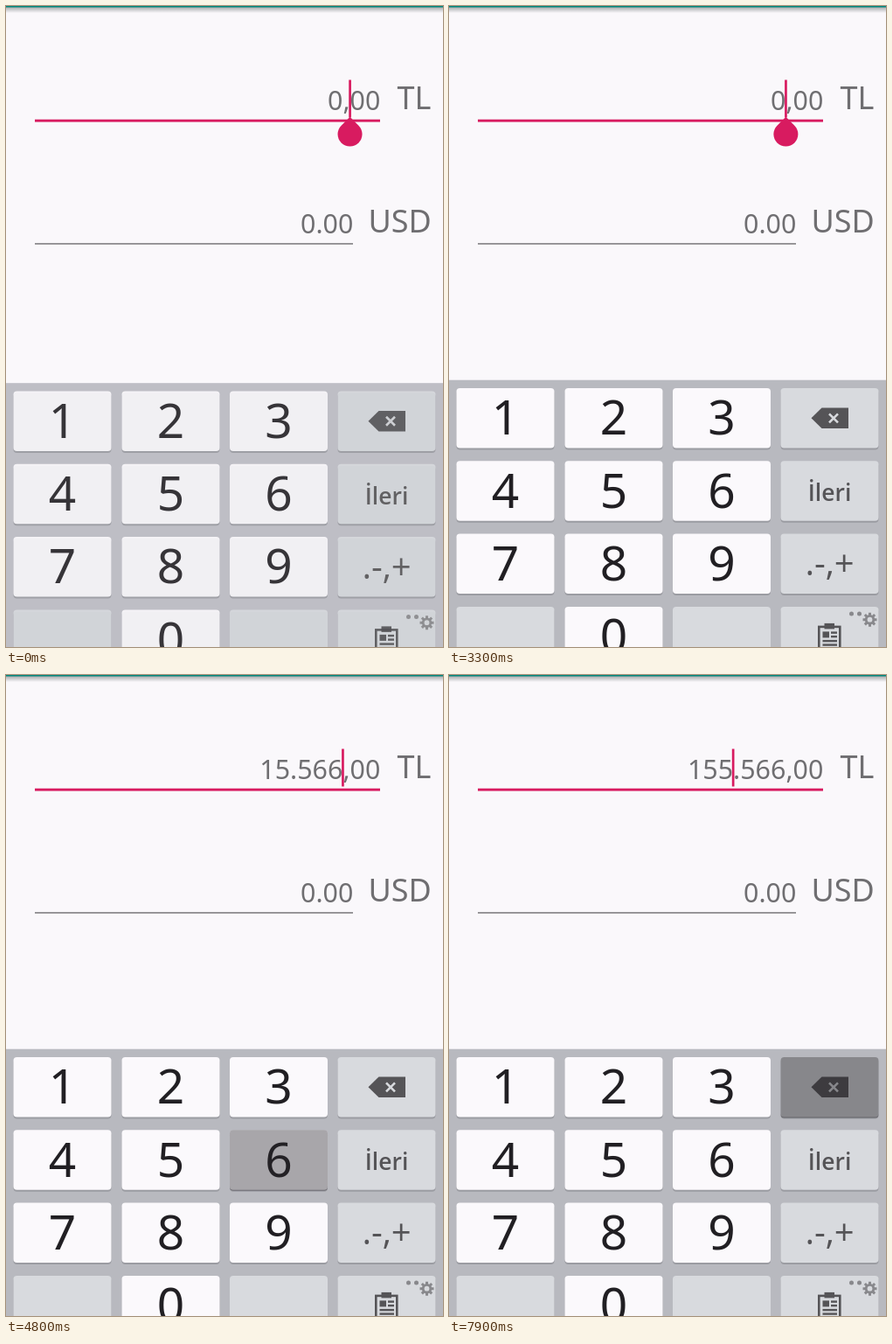
An HTML page with a canvas that plays this animation: 500x733 px, repeating every 8 s.

```html
<!DOCTYPE html>
<html lang="tr">
<head>
<meta charset="utf-8">
<title>Currency input</title>
<style>
html, body { margin: 0; width: 100%; height: 100%; overflow: hidden; background: #faf8fb; }
canvas { display: block; }
</style>
</head>
<body>
<canvas id="stage" width="500" height="733"></canvas>
<script>
const ctx = document.getElementById('stage').getContext('2d');
const LOOP = 8000;
const PAPER = '#faf8fb', PINK = '#d81b60', GREY = '#6f6e71', ICON = '#555457';
const SANS = '"Noto Sans", "Open Sans", sans-serif';
const COLS = [8.5, 132.5, 256, 379.5];
const ROWS = [437, 520.3, 603.6, 686.9];
const KEY_W = 112, KEY_H = 68.5;

// Each track is a list of [start time, value].
const amounts = [[0, '0,00'], [3500, '1,00'], [3750, '15,00'], [4050, '155,00'],
  [4500, '1.556,00'], [4800, '15.566,00'], [6000, '155.566,00'],
  [6300, '1.555.566,00'], [7700, '155.566,00']];
// The caret is placed by the text that follows it.
const carets = [[0, '00'], [1700, '0,00'], [2400, ',00'], [5500, '.566,00']];
const blinks = [[0, 1], [200, 0], [700, 1], [1200, 0], [1700, 1], [2200, 0], [2400, 1],
  [2900, 0], [3300, 1], [5400, 0], [5500, 1], [6700, 0], [7200, 1]];
const handles = [[0, '00'], [1800, '0,00'], [2400, ',00'], [3500, ''], [5500, '.566,00'], [5950, '']];
// Key presses: [row, column, down, up]
const presses = [[1, 1, 3650, 3750], [1, 1, 3950, 4050], [1, 2, 4300, 4460], [1, 2, 4680, 4780],
  [1, 1, 5900, 6000], [1, 1, 6200, 6300], [0, 3, 7700, 8000]];

function at(track, t) {
  let value = track[0][1];
  for (const [start, v] of track) if (t >= start) value = v;
  return value;
}

function text(str, x, y, size, color, align = 'left', weight = 400, family = SANS) {
  ctx.font = `${weight} ${size}px ${family}`;
  ctx.textAlign = align;
  ctx.fillStyle = color;
  ctx.fillText(str, x, y);
}

function rect(x, y, w, h, color) {
  ctx.fillStyle = color;
  ctx.fillRect(x, y, w, h);
}

function round(x, y, w, h, r, color) {
  ctx.fillStyle = color;
  ctx.beginPath();
  ctx.roundRect(x, y, w, h, r);
  ctx.fill();
}

function dot(x, y, r, color) {
  ctx.fillStyle = color;
  ctx.beginPath();
  ctx.arc(x, y, r, 0, Math.PI * 2);
  ctx.fill();
}

function caretX(tail) {
  ctx.font = `400 30.4px ${SANS}`;
  return 428.3 - ctx.measureText(tail).width;
}

function drawHandle(x, alpha) {
  const r = 14, cy = 146.6;
  ctx.globalAlpha = alpha;
  ctx.fillStyle = PINK;
  ctx.beginPath();
  ctx.arc(x, cy, r, -Math.PI / 4, Math.PI * 1.25);
  ctx.lineTo(x, cy - r * Math.SQRT2);
  ctx.fill();
  ctx.globalAlpha = 1;
}

function drawForm(t) {
  rect(0, 0, 500, 733, PAPER);
  const shade = ctx.createLinearGradient(0, 1, 0, 8);
  shade.addColorStop(0, 'rgba(60,70,70,.45)');
  shade.addColorStop(1, 'rgba(60,70,70,0)');
  rect(0, 1, 500, 7, shade);
  rect(0, 0, 500, 1.5, '#00857a');

  text('TL', 447.5, 118, 36, GREY);
  text('USD', 414.5, 259, 36, GREY);
  text(at(amounts, t), 428.3, 119, 30.4, GREY, 'right');
  text('0.00', 397.3, 260.3, 30.4, GREY, 'right');
  rect(33, 129.7, 395, 2.9, PINK);
  rect(33, 271, 364, 1.8, '#8e8d90');

  const tail = at(handles, t);
  if (tail) drawHandle(caretX(tail), t >= 1700 && t < 1800 ? 0.88 : 1);
  if (at(blinks, t)) rect(caretX(at(carets, t)) - 1.3, 84.5, 2.7, 43, PINK);
}

function drawBackspace(x, y, face) {
  ctx.fillStyle = ICON;
  ctx.beginPath();
  ctx.moveTo(x, y);
  for (const [dx, dy] of [[12, -11.8], [42.5, -11.8], [42.5, 11.8], [12, 11.8]]) ctx.lineTo(x + dx, y + dy);
  ctx.fill();
  ctx.strokeStyle = face;
  ctx.lineWidth = 2.6;
  ctx.beginPath();
  for (const s of [-1, 1]) {
    ctx.moveTo(x + 20.5, y - 5 * s);
    ctx.lineTo(x + 30.5, y + 5 * s);
  }
  ctx.stroke();
}

function drawClipboard(x, y) {
  ctx.strokeStyle = ICON;
  ctx.lineWidth = 2.6;
  ctx.strokeRect(x + 1.3, y + 4, 24, 28);
  rect(x + 7.5, y, 11.5, 6.5, ICON);
  rect(x + 5.5, y + 9.5, 7.5, 7, ICON);
  for (const dy of [9.5, 14]) rect(x + 15, y + dy, 7, 2.4, ICON);
  for (const dy of [19, 23.5]) rect(x + 5.5, y + dy, 16.5, 2.4, ICON);
}

function drawGear(x, y) {
  const color = '#88888c';
  ctx.strokeStyle = color;
  ctx.lineWidth = 3;
  ctx.beginPath();
  for (let i = 0; i < 8; i++) {
    const c = Math.cos(i * Math.PI / 4), s = Math.sin(i * Math.PI / 4);
    ctx.moveTo(x + c * 4.5, y + s * 4.5);
    ctx.lineTo(x + c * 8, y + s * 8);
  }
  ctx.stroke();
  ctx.lineWidth = 2.8;
  ctx.beginPath();
  ctx.arc(x, y, 4.3, 0, Math.PI * 2);
  ctx.stroke();
  dot(x - 21, y - 6.8, 2.5, color);
  dot(x - 12, y - 6.8, 2.5, color);
}

function drawKeyLabel(row, col, x, y, face) {
  const mid = x + KEY_W / 2;
  if (col < 3) {
    const label = row < 3 ? String(row * 3 + col + 1) : col === 1 ? '0' : '';
    text(label, mid, y + 53.2, 55, '#211f23', 'center');
  } else if (row === 0) {
    drawBackspace(x + 35, y + 34.3, face);
  } else if (row === 1) {
    text('İleri', mid, y + 46, 26.5, ICON, 'center', 600, '"Open Sans", sans-serif');
  } else if (row === 2) {
    text('.-,+', mid, y + 47.5, 40, ICON, 'center', 500, '"Open Sans", sans-serif');
  } else {
    drawClipboard(x + 42.5, y + 19);
    drawGear(x + 102, y + 14.8);
  }
}

function pressLevel(row, col, t) {
  let level = 0;
  for (const [r, c, down, up] of presses) {
    if (r !== row || c !== col || t < down) continue;
    level = Math.max(level, t < up ? 1 : 1 - (t - up) / 80);
  }
  return level;
}

function drawKeyboard(t) {
  const rise = Math.max(0, 1 - t / 180);
  ctx.save();
  ctx.globalAlpha = 1 - 0.1 * rise;
  ctx.translate(0, 3.5 * rise);
  rect(0, 427.7, 500, 310, '#b8b9bf');
  ROWS.forEach((y, row) => COLS.forEach((x, col) => {
    const light = col < 3 && (row < 3 || col === 1);
    const face = light ? '#fbf9fc' : '#d8dade';
    round(x, y + 2, KEY_W, KEY_H, 4, '#9b9ca2');
    round(x, y, KEY_W, KEY_H, 4, face);
    drawKeyLabel(row, col, x, y, face);
    const level = pressLevel(row, col, t);
    if (level > 0) {
      round(x, y, KEY_W, KEY_H + 1, 4, `rgba(${light ? '40,38,42,.53' : '30,28,32,.44'})`.replace(/,\.(\d+)/, (m, d) => ',' + ('.' + d) * level));
    }
  }));
  ctx.restore();
}

function frame() {
  const t = performance.now() % LOOP;
  drawForm(t);
  drawKeyboard(t);
  requestAnimationFrame(frame);
}
frame();
</script>
</body>
</html>
```
